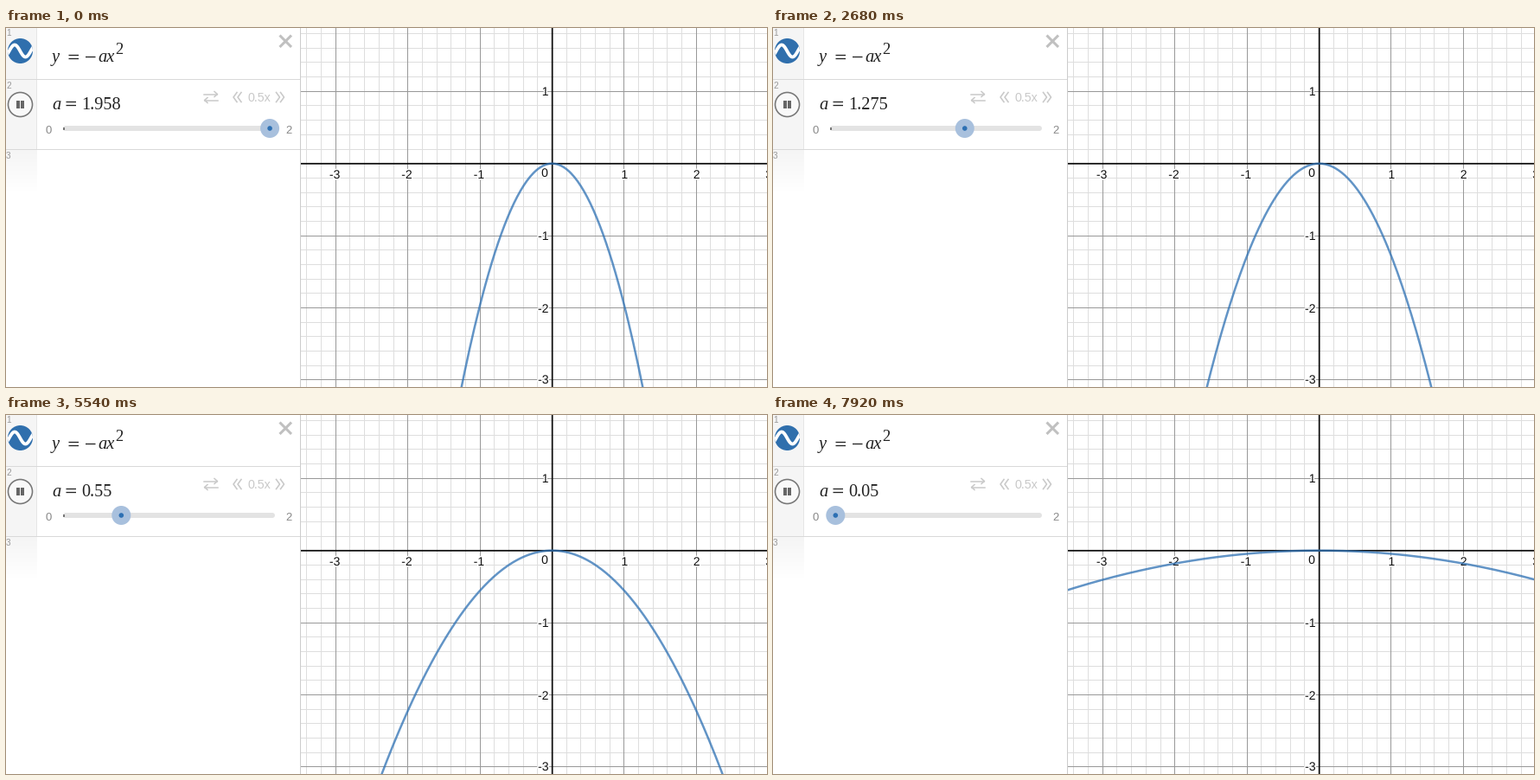
These frames come from a looping animation (880x415 px, 8000 ms). A matplotlib script:

```python
import numpy as np
import matplotlib.pyplot as plt
import matplotlib.patheffects as pe
from matplotlib.animation import FuncAnimation
from matplotlib.collections import LineCollection
from matplotlib.patches import Circle, Rectangle

W, H, DPI = 880, 415, 80
PT = 72 / DPI                 # points per pixel
LOOP, STEP_MS = 8000, 20
STEPS = 104                   # visible updates per loop
X0, Y0, UNIT = 631.5, 156.7, 83.4
PANEL = 341
BLUE = "#2d70b3"
SANS, SERIF = "Liberation Sans", "Liberation Serif"

# The parameter falls steadily and bounces off zero.
KNOT_STEPS = [0, 14, 35, 62, 72, 86, 103]
KNOT_VALUES = [1.958, 1.683, 1.275, 0.746, 0.55, 0.279, -0.05]
CURVE_LAG = 0.005             # the curve trails the readout slightly

fig = plt.figure(figsize=(W / DPI, H / DPI), dpi=DPI, facecolor="white")
ax = fig.add_axes([0, 0, 1, 1])
ax.set_xlim(0, W)
ax.set_ylim(H, 0)
ax.axis("off")


def line(xs, ys, color, width, z=6, **kw):
    return ax.plot(xs, ys, color=color, lw=width * PT, zorder=z, **kw)[0]


def dash(x1, x2, y):
    line([x1, x2], [y, y], "#222222", 1.3, snap=False, solid_capstyle="butt")


def rect(x, y, w, h, color, z=5):
    ax.add_patch(Rectangle((x, y), w, h, fc=color, ec="none", zorder=z))


def disc(x, y, r, z=6, **kw):
    return ax.add_patch(Circle((x, y), r, zorder=z, **kw))


def label(x, y, s, size, color, font=SANS, ha="center", z=7, **kw):
    return ax.text(x, y, s, fontsize=size * PT, color=color, family=font,
                   ha=ha, va="baseline", zorder=z, **kw)


def draw_grid():
    minor, major = [], []
    for k in range(-18, 16):
        x = np.floor(X0 + k * UNIT / 5) + 0.5
        if k and PANEL < x < W:
            (minor if k % 5 else major).append([(x, 0), (x, H)])
    for k in range(-10, 17):
        y = np.floor(Y0 + k * UNIT / 5) + 0.5
        if k and 0 < y < H:
            (minor if k % 5 else major).append([(PANEL, y), (W, y)])
    for segs, color, z in ((minor, "#dedede", 1), (major, "#999999", 2)):
        ax.add_collection(LineCollection(segs, colors=color, linewidths=PT,
                                         zorder=z, snap=False))
    line([X0 + 0.2] * 2, [0, H], "#0c0c0c", 1.75, 2.5, snap=False)
    line([PANEL, W], [Y0 + 0.1] * 2, "#0c0c0c", 1.75, 2.5, snap=False)

    halo = [pe.withStroke(linewidth=3 * PT, foreground="white")]
    style = dict(size=14, color="#111111", z=3, path_effects=halo)
    for n in (-3, -2, -1, 1, 2, 3):
        shift = -1.2 if n < 0 else 0.4
        label(X0 + n * UNIT + shift, 174, str(n), **style)
    label(623, 172, "0", **style)
    for n, y in ((1, 78), (-1, 245), (-2, 329), (-3, 411)):
        label(627.5, y, str(n), ha="right", **style)


def draw_panel():
    rect(0, 0, PANEL, H, "white")
    rect(340, 0, 1, H, "#cccccc")
    rect(0, 0, 36, 141, "#f5f5f5")
    rect(35, 0, 1, 141, "#e6e6e6")
    fade = np.linspace(0.961, 1, 48)[:, None, None] * np.ones((1, 1, 3))
    ax.imshow(fade, extent=(0, 36, 189, 141), aspect="auto", zorder=5)
    for y in (59, 140):
        rect(0, y, 340, 1, "#d9d9d9", 5.5)
    for n, y in ((1, 9), (2, 70), (3, 151)):
        label(0, y, str(n), 10, "#999999", ha="left")


def draw_formula_row():
    icon = disc(16.5, 26.5, 14.5, fc="#2f6fad", ec="none")
    xs = np.linspace(0, 33, 60)
    wave = line(xs, 26.5 - 7 * np.cos(np.pi * (xs - 10) / 12.5), "white", 3.8, 7)
    wave.set_clip_path(icon)

    ink = "#222222"
    label(53, 39, "y", 20.5, ink, SERIF, "left", style="italic")
    dash(72.5, 84, 31.5)
    dash(72.5, 84, 35.5)
    dash(92, 103.5, 33.5)
    label(106, 39, "ax", 20.5, ink, SERIF, "left", style="italic")
    label(126, 30, "2", 18.5, ink, SERIF, "left")

    for ys in ((8.5, 22), (22, 8.5)):
        line([316.5, 330], ys, "#c0c0c0", 3, solid_capstyle="butt")


def draw_slider_row():
    disc(16.5, 88.5, 14, fc="#f9f9f9", ec="#777777", lw=1.6 * PT)
    for x in (12, 17):
        rect(x, 84, 4, 9, "#666666", 7)

    pale = "#c9c9c9"
    label(53, 94, "a", 20.5, "#222222", SERIF, "left", style="italic")
    dash(69.5, 81, 85.5)
    dash(69.5, 81, 89.5)

    # loop arrows
    line([229, 244], [76.5, 76.5], pale, 1.5)
    line([241, 244.5, 241], [73.5, 76.5, 79.5], pale, 1.5)
    line([230, 245], [83.5, 83.5], pale, 1.5)
    line([233, 229.5, 233], [80.5, 83.5, 86.5], pale, 1.5)

    # speed control
    for x, d in ((267, -4), (272, -4), (312.5, 4), (317.5, 4)):
        line([x, x + d, x], [74.5, 80, 85.5], pale, 1.6)
    label(292.5, 85, "0.5x", 14.3, pale)

    label(49.5, 122, "0", 13, "#888888")
    label(326.5, 122, "2", 13, "#888888")
    line([69, 307.5], [116, 116], "#e3e3e3", 6, solid_capstyle="round")
    rect(66, 115, 2, 2.5, "#777777", 6.5)


draw_grid()
draw_panel()
draw_formula_row()
draw_slider_row()

curve_x = np.linspace(PANEL - 5, W + 5, 300)
curve = line(curve_x, curve_x, BLUE, 2.5, 4, alpha=0.75)
value = label(87.3, 94, "", 20.3, "#222222", SERIF, "left")
knob = disc(0, 116, 11, 8, fc="#a8c0dd", ec="none")
dot = disc(0, 116, 2.8, 9, fc=BLUE, ec="none")


def update(i):
    step = min(int((i + 1) * STEP_MS * STEPS / LOOP), STEPS - 1)
    level = np.interp(step, KNOT_STEPS, KNOT_VALUES)
    a = abs(level)
    bend = abs(level + CURVE_LAG)
    curve.set_ydata(Y0 + bend * (curve_x - X0) ** 2 / UNIT)
    value.set_text(f"{a:.3f}".rstrip("0").rstrip("."))
    for part in (knob, dot):
        part.center = (66.2 + 122 * a, 116)
    return curve, value, knob, dot


anim = FuncAnimation(fig, update, frames=LOOP // STEP_MS, interval=STEP_MS,
                     init_func=lambda: update(0), repeat=True, repeat_delay=0)
plt.show()
```
